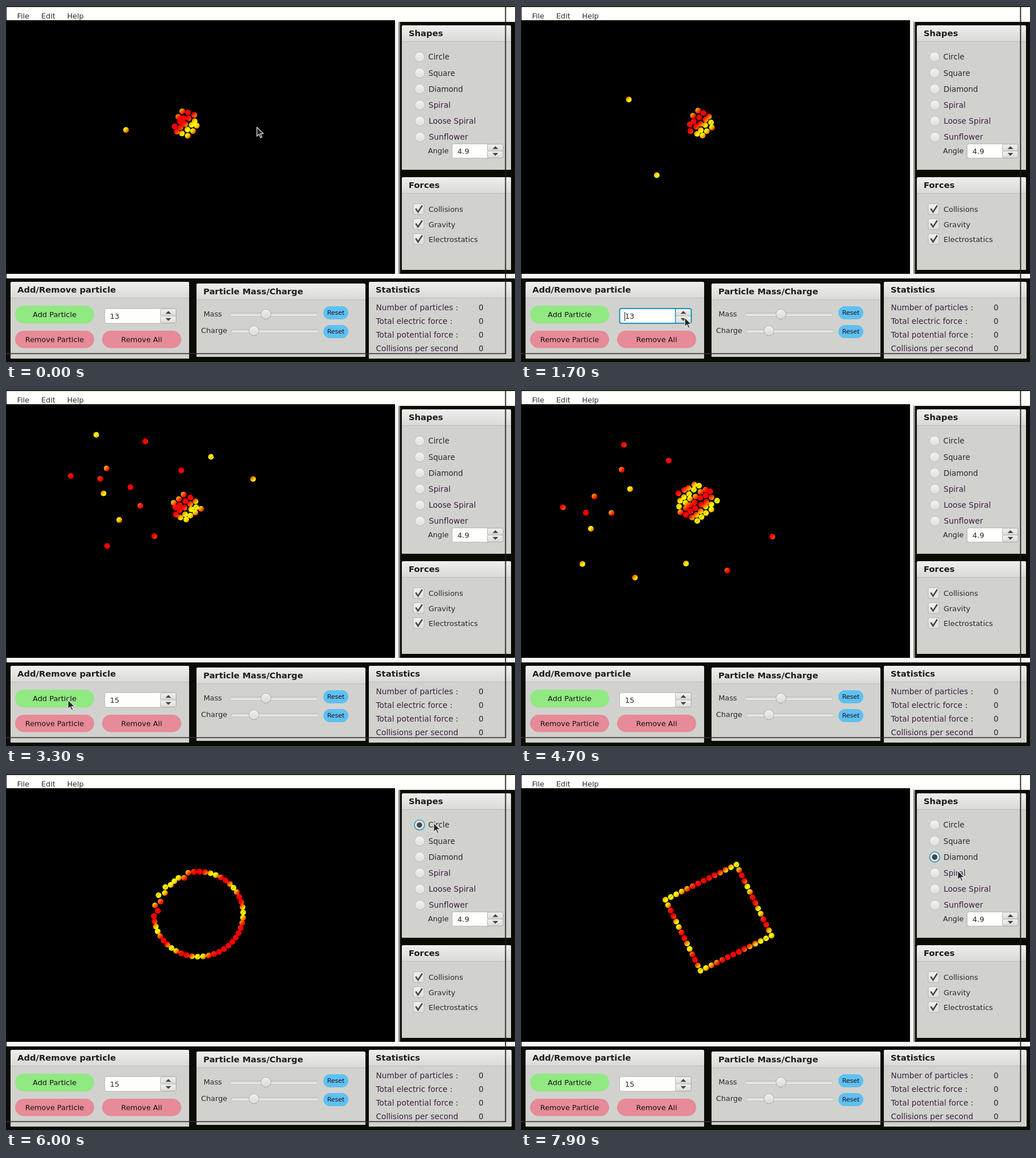
Animation of 895 by 626 pixels, one loop 8 s. Source, as an HTML page with a canvas:

```html
<!DOCTYPE html>
<html lang="en">
<head>
<meta charset="utf-8">
<title>Particle simulator</title>
<style>
html, body { margin: 0; width: 100%; height: 100%; overflow: hidden; background: #000; }
canvas { display: block; }
</style>
</head>
<body>
<canvas id="stage" width="895" height="626"></canvas>
<script>
const g = document.getElementById('stage').getContext('2d');
const LOOP = 8000, STEP = 100, TAU = Math.PI * 2, DEG = Math.PI / 180;
const FONT = '"DejaVu Sans", Verdana, sans-serif';
const INK = '#2a2a2a', PLUM = '#3c2045';

const clamp = u => Math.max(0, Math.min(1, u));
const lerp = (a, b, u) => a + (b - a) * u;
const ease = u => 1 - (1 - u) ** 3;
const smooth = u => u * u * (3 - 2 * u);
const mix = (p, q, u) => [lerp(p[0], q[0], u), lerp(p[1], q[1], u)];

// ---------- particles ----------
const COUNT = 52, CORE = 18, FIRST = 20, SECOND = 34, SWARM = 14;
const RADIUS = 5, CX = 313, CY = 203;
const FIRST_AT = 2900, SECOND_AT = 3900;
const CIRCLE_AT = 5350, SQUARE_AT = 6650, DIAMOND_AT = 7300;

const dist = p => Math.hypot(p[0] - CX, p[1] - CY);
const angle = p => Math.atan2(p[1] - CY, p[0] - CX);
const polar = (r, a) => [CX + r * Math.cos(a), CY + r * Math.sin(a)];
const swirl = (p, a, k) => polar(dist(p) * k, angle(p) + a);

// The clump is a hexagonal packing, filled from the middle outwards
const sites = [];
for (let u = -4; u <= 4; u++)
  for (let v = -4; v <= 4; v++) sites.push([10.7 * (u + v / 2), 10.7 * v * Math.sqrt(3) / 2]);
const rank = ([x, y]) => Math.hypot(x - 0.9, y + 0.5);
sites.sort((a, b) => rank(a) - rank(b));

function clump(i, t) {
  const [x, y] = sites[i < SECOND ? i : i - SWARM];
  const s = t / 1000, drift = smooth(clamp((t - 3300) / 1400));
  const a = (14 + 3.6 * s + 6 * Math.sin(s * 3.8)) * DEG;
  return [lerp(315, 306.5, drift) + x * Math.cos(a) - y * Math.sin(a) + 1.3 * Math.sin(s * 9 + i * 2.4),
          lerp(206.5, 197, drift) + x * Math.sin(a) + y * Math.cos(a) + 1.3 * Math.cos(s * 8 + i * 1.7)];
}

// A swarm is densest around one direction and widest there
function swarm(k, mid, down, up, reach, bulge, wave, phase) {
  const v = (2 * k + 1 - SWARM) / (SWARM - 1);
  const a = mid + (v > 0 ? up : down) * v * Math.abs(v);
  return polar(reach + bulge * (1 - v * v) + wave * Math.sin(k * Math.PI / 2 + phase), a * DEG);
}

// Keys: time, point, extra turns on the way there
function keysOf(i) {
  if (i < CORE) return [[0, clump(i, 0)]];
  if (i === CORE) return [[0, [211, 218]], [900, [360, 103]], [2500, [380, 149], 1], [3300, clump(i, 3300)]];
  if (i < FIRST) return [[0, [311, 205]], [900, [396, 168]], [2500, [380, 308], 1], [3300, clump(i, 3300)]];
  if (i < SECOND) {
    const p = swarm(i - FIRST, 198, 64, 141, 75, 80, 55, 0);
    return [[FIRST_AT, swirl(p, -0.5, 1.22)], [3300, p], [4700, clump(i, 4700)]];
  }
  if (i < SECOND + SWARM) {
    const p = swarm(i - SECOND, 176, 153, 60, 95, 105, 45, Math.PI / 2);
    return [[SECOND_AT, swirl(p, -0.5, 1.22)], [4700, p], [CIRCLE_AT, swirl(p, 0.6, 0.85)]];
  }
  return [[SECOND_AT, clump(i, SECOND_AT)]];
}
const paths = Array.from({ length: COUNT }, (_, i) => keysOf(i));

function orbit(p, q, u, turns) {
  let d = angle(q) - angle(p);
  d -= TAU * Math.round(d / TAU);
  const r = lerp(dist(p), dist(q), u) + 22 * turns * Math.sin(Math.PI * u);
  return polar(r, angle(p) + (d + TAU * turns) * u);
}

function roam(i, t) {
  const keys = paths[i];
  if (t < keys[0][0]) return null;
  const n = keys.findIndex(k => t < k[0]);
  if (n < 0) return clump(i, t);
  const [ta, p] = keys[n - 1], [tb, q, turns = 0] = keys[n];
  return orbit(p, q, (t - ta) / (tb - ta), turns);
}

// Slots run clockwise from the top; the last ones still sag inwards
function circleSlot(s) {
  const a = (-96 + s * 360 / 50) * DEG;
  const sag = s > 38 && s < 49 ? 4 + 4 * Math.sin(s * 2.8) : 0;
  return [338.5 + (78.5 - sag) * Math.cos(a), 246.5 + (74.7 - sag) * Math.sin(a)];
}

function squareSlot(s, turn) {
  const n = (s + COUNT - 6) % COUNT, side = Math.floor(n / 13), h = 69.7;
  const y = -h + 2 * h * (n % 13) / 13, a = side * Math.PI / 2 - turn;
  return [347.2 + h * Math.cos(a) - y * Math.sin(a), 252.7 + h * Math.sin(a) + y * Math.cos(a)];
}

function place(i, t) {
  if (t < CIRCLE_AT) return roam(i, t);
  const s = i * 11 % COUNT, ring = circleSlot(s);
  if (t < SQUARE_AT) return mix(roam(i, CIRCLE_AT - 1), ring, ease(clamp((t - CIRCLE_AT) / 620)));
  const turn = 26.3 * DEG * clamp((t - DIAMOND_AT) / 600);
  return mix(ring, squareSlot(s, turn), smooth(clamp((t - SQUARE_AT) / 500)));
}

// Colour depends on x + y: yellow and red mirrored every 30 px
const fire = g.createLinearGradient(0, 0, 600, 600);
for (let s = 0; s <= 1200; s += 5) {
  const away = Math.abs(s - 60 * Math.round(s / 60));
  fire.addColorStop(s / 1200, `rgb(255,${Math.round(255 * (1 - smooth(clamp((away - 1) / 23))))},0)`);
}

function particles(t) {
  for (let i = 0; i < COUNT; i++) {
    const p = place(i, t);
    if (!p) continue;
    const [x, y] = p;
    disc(x, y, RADIUS, fire);
    const off = Math.round((x + y) / 60) * 60 - x - y;
    if (Math.abs(off) < 3) {
      const mx = x + off / 2, my = y + off / 2;
      line([[mx - 3.2, my + 3.2], [mx + 3.2, my - 3.2]], 'rgba(20,20,0,.7)', 0.8);
    }
  }
}

// ---------- drawing helpers ----------
function rect(x, y, w, h, c) { g.fillStyle = c; g.fillRect(x, y, w, h); }
function disc(x, y, r, c) {
  g.fillStyle = c;
  g.beginPath();
  g.arc(x, y, r, 0, TAU);
  g.fill();
}
function pill(x, y, w, h, r, c, edge, lw = 1) {
  g.beginPath();
  g.roundRect(x, y, w, h, r);
  g.fillStyle = c;
  g.fill();
  if (edge) { g.strokeStyle = edge; g.lineWidth = lw; g.stroke(); }
}
function line(pts, c, w) {
  g.beginPath();
  pts.forEach(([x, y]) => g.lineTo(x, y));
  g.strokeStyle = c;
  g.lineWidth = w;
  g.stroke();
}
function shape(pts, c) {
  g.beginPath();
  pts.forEach(([x, y]) => g.lineTo(x, y));
  g.closePath();
  g.fillStyle = c;
  g.fill();
}
function text(s, x, y, size = 13, c = INK, weight = '') {
  g.font = `${weight} ${size}px ${FONT}`;
  g.fillStyle = c;
  g.fillText(s, x, Math.round(y));
}
function shade(y, h, a, b) {
  const f = g.createLinearGradient(0, y, 0, y + h);
  f.addColorStop(0, a);
  f.addColorStop(1, b);
  return f;
}

// ---------- widgets ----------
function panel(x, y, w, h, title) {
  pill(x, y, w, h, [3, 3, 0, 0], '#d1d2ce');
  pill(x, y, w, 28, [3, 3, 0, 0], shade(y, 28, '#efefed', '#d9dad6'));
  rect(x, y + 28, w, 1, '#bdbeba');
  text(title, x + 12, y + 19, 14.75, '#1c1c1c', 'bold');
}
function button(label, x, y, w, h, c, size) {
  pill(x, y, w, h, h / 2, c);
  g.textAlign = 'center';
  text(label, x + w / 2, y + h / 2 + size * 0.34, size, '#151515');
  g.textAlign = 'left';
}
function stepper(x, y, h, dir) {
  pill(x, y, 27.5, h, 2, shade(y, h, '#f2f2f0', '#dadad7'), '#b4b5b1');
  const m = x + 14, c = y + h / 2;
  shape([[m - 5, c + 2.5 * dir], [m, c - 2.5 * dir], [m + 5, c + 2.5 * dir]], '#444');
}
function spinner(x, y, w, h, value, focus) {
  const bx = x + w - 28;
  pill(x, y, w, h, 3, '#fefefc', '#b4b5b1');
  stepper(bx, y + 0.5, h / 2 - 0.5, 1);
  stepper(bx, y + h / 2, h / 2 - 0.5, -1);
  if (focus) {
    line([[bx, y], [bx, y + h]], '#1e93c0', 1.5);
    pill(x, y, w, h, 3, 'transparent', '#1e93c0', 2);
    rect(x + 8.5, y + 6, 1, 16, '#222');
  }
  text(value, x + 9.3, y + h / 2 + 5);
}
function radio(label, x, y, tx, size, c, on) {
  disc(x, y, on ? 9.8 : 9.2, on ? '#3a9fc9' : '#bcbdb9');
  disc(x, y, on ? 8 : 8.3, shade(y - 9, 18, '#f4f4f2', '#dededb'));
  if (on) disc(x, y, 4.8, '#484844');
  text(label, tx, y + 4.7, size, c);
}
function check(label, y) {
  pill(716, y - 9.5, 19, 19, 3, shade(y - 9, 19, '#f1f1ef', '#dededb'), '#b2b3af');
  line([[720.5, y - 1], [724.5, y + 5], [732, y - 6.5]], '#474747', 2.6);
  text(label, 743, y + 5, 12.9);
}
function slider(label, tx, x, y, knob) {
  text(label, tx, y + 4.2, 12.8);
  pill(x, y - 2.5, 154, 6, 3, shade(y - 3, 6, '#c3c4c0', '#f6f6f4'), '#bfc0bc');
  disc(knob, y, 9.2, '#aeafab');
  disc(knob, y, 8.3, shade(y - 9, 18, '#f3f3f1', '#d8d8d5'));
}

function windowAt(t) {
  rect(0, 0, 895, 626, '#0b0b04');
  rect(0, 1.5, 895, 24, '#fffffb');
  rect(684, 25, 211, 3, '#f4f4f0');
  rect(684, 25, 6, 446, '#f3f4ef');
  rect(690, 28, 3, 443, '#8c8c88');
  rect(0, 471, 895, 8, '#f8f9f4');
  rect(1, 25, 683, 446, '#000');
  text('File', 19.5, 22, 12.8);
  text('Edit', 62, 22, 12.8);
  text('Help', 107.5, 22, 12.8);

  panel(696, 34, 192, 254, 'Shapes');
  const picked = t < 5400 ? -1 : t < SQUARE_AT ? 0 : t < DIAMOND_AT ? 1 : 2;
  ['Circle', 'Square', 'Diamond', 'Spiral', 'Loose Spiral', 'Sunflower'].forEach((s, k) => {
    radio(s, 727 + k / 5, 89.7 + k * 28.2, 742.5 + k / 5, 13.2 + k * 0.12, k > 2 ? PLUM : INK, k === picked);
  });
  text('Angle', 742, 259, 12.8);
  spinner(784.5, 242.5, 90, 25, '4.9', false);

  panel(696, 301, 192, 163, 'Forces');
  ['Collisions', 'Gravity', 'Electrostatics'].forEach((s, k) => check(s, 357.2 + k * 26.3));

  panel(8, 485, 314, 135, 'Add/Remove particle');
  button('Add Particle', 16, 527, 139, 31, '#91e981', 12.95);
  button('Remove Particle', 16, 571, 139, 30.5, '#e68b97', 12.8);
  button('Remove All', 169, 571, 139, 30.5, '#e68b97', 12.8);
  const value = t < 1900 ? 13 : t < 2200 ? 14 : 15;
  spinner(173.5, 532, 126, 26, value, t >= 500 && t < FIRST_AT);

  panel(335, 488, 297, 129, 'Particle Mass/Charge');
  slider('Mass', 347.5, 394, 542, 457);
  slider('Charge', 343, 396, 571, 436);
  button('Reset', 558, 528, 44, 23, '#60bff2', 11);
  button('Reset', 558, 561, 44, 23, '#60bff2', 11);

  panel(638, 485, 251, 135, 'Statistics');
  ['Number of particles :', 'Total electric force :', 'Total potential force :', 'Collisions per second'].forEach((s, k) => {
    const y = 535 + k * 24;
    text(s, 650.5, y, 13.7, PLUM);
    text('0', 831, y, 13.5);
  });

  rect(0, 0, 895, 1.5, '#0a0a0a');
  rect(0, 0, 1, 626, '#0a0a0a');
  rect(877.5, 0, 1.8, 612, '#20201c');
  rect(0, 610.5, 879, 1.6, '#33332f');
}

// ---------- pointer ----------
const route = [[0, 441, 213], [900, 404, 139], [1700, 288, 548], [2500, 287, 535], [3000, 109, 545],
  [4600, 109, 544], [4900, 858, 250], [5350, 752, 86], [6000, 752, 86], [7200, 754, 141], [7900, 768, 170]];

function pointer(t) {
  if (t >= 4600 && t < 4900) return;
  const n = route.findIndex(k => t <= k[0]) || 1;
  const [ta, ...p] = route[n - 1], [tb, ...q] = route[n];
  g.save();
  g.translate(...mix(p, q, smooth((t - ta) / (tb - ta))));
  const arrow = [[0, 0], [0, 16], [3.8, 12.6], [6.6, 18.6], [9, 17.4], [6.4, 11.6], [11.5, 11.5]];
  shape(arrow, '#262626');
  line([...arrow, arrow[0]], '#e6e6e6', 1.2);
  g.restore();
}

let shown = -1;
function frame() {
  const t = Math.floor(performance.now() % LOOP / STEP) * STEP;
  if (t !== shown) {
    shown = t;
    windowAt(t);
    particles(t);
    pointer(t);
  }
  requestAnimationFrame(frame);
}
frame();
</script>
</body>
</html>
```
